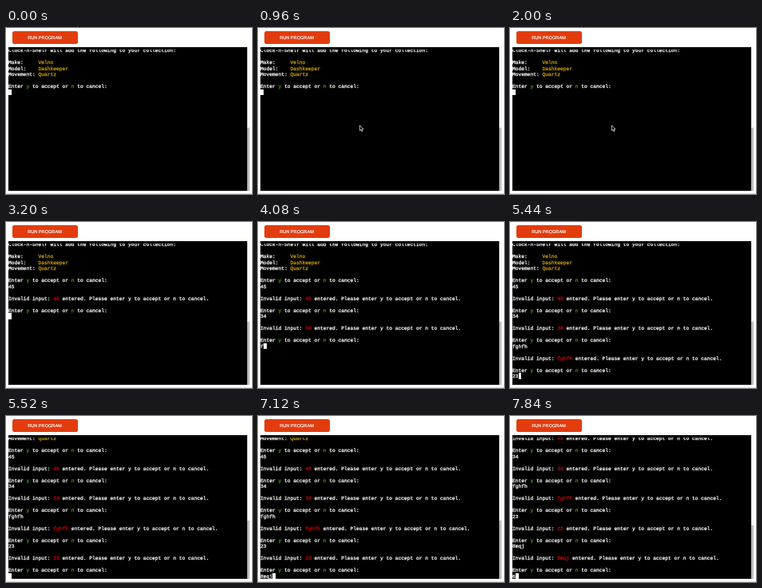
Write an HTML page that moves like this. It is 308 px wide and 208 px high and loops after 8000 ms.

```html
<!DOCTYPE html>
<html lang="en">
<head>
<meta charset="utf-8">
<title>Watch collection terminal</title>
<style>
  html, body { margin: 0; width: 100%; height: 100%; overflow: hidden; background: #fff; }
  #stage { position: relative; width: 308px; height: 208px; overflow: hidden; background: #fff; }
  #stage > * { position: absolute; }
  #run {
    left: 7.5px; top: 4px; width: 82.5px; height: 16px;
    border-radius: 2.5px; background: #e23c0e; overflow: hidden;
  }
  /* Large type scaled down keeps fractional character widths exact. */
  #run span {
    position: absolute; left: -1px; top: 0; width: 1482px; height: 286px;
    transform: scale(.056); transform-origin: 0 0;
    font: 100px/286px "Liberation Sans", Arial, sans-serif;
    -webkit-text-stroke: 3px; color: #fff; text-align: center;
    text-rendering: geometricPrecision;
  }
  #term { left: 3px; top: 24px; width: 299px; height: 180px; background: #000; overflow: hidden; }
  #text {
    position: absolute; left: 0; top: 1px; margin: 0;
    transform: scale(.0625); transform-origin: 0 0;
    font: 100px/120px "Liberation Mono", "Courier New", monospace;
    -webkit-text-stroke: 4px; color: #fff; white-space: pre;
    text-rendering: geometricPrecision;
  }
  /* The terminal's upper edge cuts slightly into the first row. */
  #edge { position: absolute; left: 0; top: 0; width: 100%; height: 2.7px; background: #000; }
  .g { color: #4e9a06; }
  .r { color: #cc0000; }
  .a { color: #cca010; }
  #caret { position: absolute; width: 3.75px; height: 7.5px; background: #fff; }
  #track { left: 302px; top: 24px; width: 3px; height: 180px; background: #f4f4f4; }
  #thumb { position: absolute; left: 0; bottom: 0; width: 3px; background: #bdbdbd; }
  #base { left: 0; bottom: 0; width: 100%; height: 1px; background: #ddd; }
  #pointer { left: 0; top: 0; width: 6px; height: 9px; overflow: visible; }
</style>
</head>
<body>
<div id="stage">
  <div id="run"><span>RUN PROGRAM</span></div>
  <div id="term"><pre id="text"></pre><div id="edge"></div><div id="caret"></div></div>
  <div id="track"><div id="thumb"></div></div>
  <div id="base"></div>
  <svg id="pointer" viewBox="0 0 6 9">
    <path d="M.4 .4V7L1.9 5.7 2.9 8.1 4 7.6 3 5.3H5Z" fill="#000" stroke="#fff" stroke-width=".7"/>
  </svg>
</div>
<script>
const LOOP = 8000, STEP = 80;
const ROWS = 24, COL = 3.75, ROW = 7.5;
const HISTORY = 31; // rows already scrolled out of sight at the start

const $ = id => document.getElementById(id);
const paint = (cls, s) => `<span class="${cls}">${s}</span>`;

const prompt = `Enter ${paint('g', 'y')} to accept or ${paint('g', 'n')} to cancel:`;
const intro = [
  'Clock-n-Shelf will add the following to your collection:',
  '',
  'Make:     ' + paint('a', 'Velno'),
  'Model:    ' + paint('a', 'Dashkeeper'),
  'Movement: ' + paint('a', 'Quartz'),
  '',
  prompt
];
const reject = s =>
  `Invalid input: ${paint('r', s)} entered. Please enter y to accept or n to cancel.`;

const keys = [
  [2080, '4'], [2480, '5'], [2800, '\n'],
  [3280, '3'], [3520, '4'], [3760, '\n'],
  [4080, 'f'], [4160, 'g'], [4240, 'h'], [4400, 'f'], [4560, 'h'], [4720, '\n'],
  [5200, '2'], [5440, '3'], [5520, '\n'],
  [6480, '8'], [6880, 'm'], [7040, 'q'], [7120, 'j'], [7360, '\n'],
  [7840, '6']
];

function drawTerminal(count) {
  const lines = [...intro];
  let input = '';
  for (const [, key] of keys.slice(0, count)) {
    if (key === '\n') {
      lines.push(input, '', reject(input), '', prompt);
      input = '';
    } else input += key;
  }
  lines.push(input);

  const scroll = Math.max(0, lines.length - ROWS);
  const shown = lines.slice(scroll);
  $('text').innerHTML = shown.join('\n');
  $('caret').style.left = input.length * COL + 'px';
  $('caret').style.top = (shown.length - 1) * ROW + 'px';
  $('thumb').style.height = ROWS * ROW * ROWS / (ROWS + HISTORY + scroll) + 'px';
}

function drawPointer(t) {
  const p = Math.min(1, Math.max(0, (t - 240) / 400));
  const e = 1 - (1 - p) ** 2;
  $('pointer').style.visibility = t >= 240 && t < 2080 ? 'visible' : 'hidden';
  $('pointer').style.transform = `translate(${190 - 63 * e}px, ${188.5 - 67 * e}px)`;
}

let drawn = -1;
function tick() {
  const now = performance.now() % LOOP;
  const t = Math.floor(now / STEP) * STEP;
  const count = keys.filter(([at]) => at <= t).length;
  if (count !== drawn) drawTerminal(drawn = count);
  drawPointer(t);
  requestAnimationFrame(tick);
}
tick();
</script>
</body>
</html>
```
